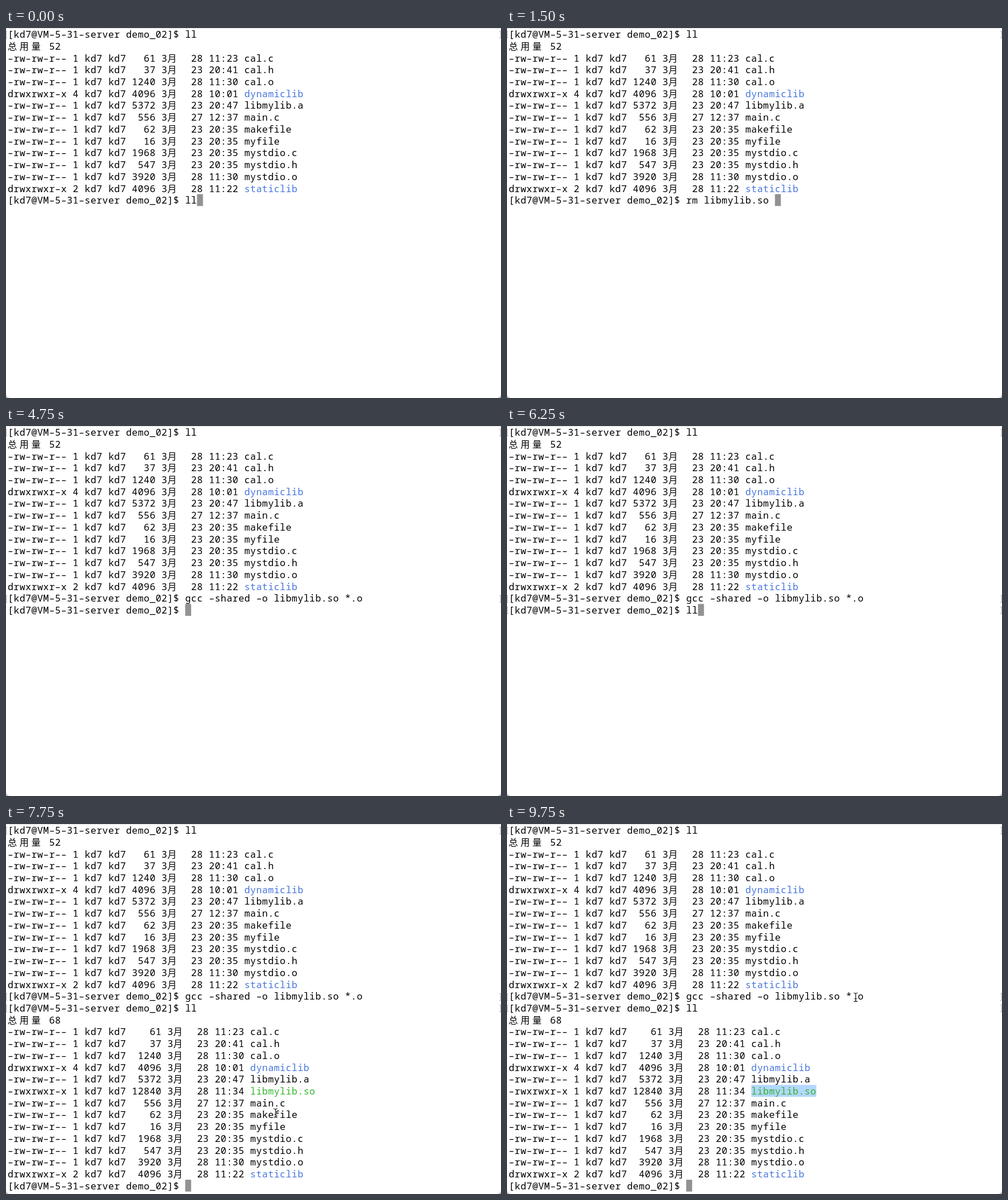
These frames come from a looping animation (866 by 647 pixels, 10000 ms). An HTML page:

```html
<!DOCTYPE html>
<html lang="zh">
<head>
<meta charset="utf-8">
<title>Terminal</title>
<style>
  html, body { margin: 0; width: 100%; height: 100%; overflow: hidden; background: #b9b9b9; }
  svg { display: block; width: 866px; height: 647px; }
  text { font: 16.5px "Noto Sans Mono", monospace; letter-spacing: .45px; white-space: pre; }
  text.han { font: 16px "Noto Sans CJK SC", "Noto Sans CJK", sans-serif; letter-spacing: 0; }
  .mark { fill: none; stroke: #b4b4b4; }
  .halo { stroke: #fff; stroke-width: 3; }
  .beam { stroke: #111; stroke-width: 1.2; }
  #mouse { fill: none; stroke-linecap: round; }
</style>
</head>
<body>
<svg id="stage" viewBox="0 0 866 647">
  <path d="M0 0H866V639Q866 647 858 647H8Q0 647 0 639Z" fill="#fff"/>
  <path d="M0 .5H866" stroke="#dcdcdc"/>
  <rect id="select" height="20.7" fill="#b3d7ff"/>
  <rect id="caret" width="10.4" height="20.7" fill="#929292"/>
  <g id="screen"></g>
  <g id="mouse">
    <path class="halo" d="M-3-7.5Q0-7.5 0-5.5Q0-7.5 3-7.5M0-5.5V5.5M-3 7.5Q0 7.5 0 5.5Q0 7.5 3 7.5M-1.5 2.5H1.5"/>
    <path class="beam" d="M-3-7.5Q0-7.5 0-5.5Q0-7.5 3-7.5M0-5.5V5.5M-3 7.5Q0 7.5 0 5.5Q0 7.5 3 7.5M-1.5 2.5H1.5"/>
  </g>
</svg>
<script>
const CELL = 10.35, LINE = 20.72, LOOP = 10000;
const BLUE = '#4876dc', GREEN = '#34b42c';
const PROMPT = '[kd7@VM-5-31-server demo_02]$ ';
const BUILD = 'gcc -shared -o libmylib.so *.o';
const FILES = `-rw-rw-r-- 1 61 28 11:23 cal.c
-rw-rw-r-- 1 37 23 20:41 cal.h
-rw-rw-r-- 1 1240 28 11:30 cal.o
drwxrwxr-x 4 4096 28 10:01 dynamiclib
-rw-rw-r-- 1 5372 23 20:47 libmylib.a
-rw-rw-r-- 1 556 27 12:37 main.c
-rw-rw-r-- 1 62 23 20:35 makefile
-rw-rw-r-- 1 16 23 20:35 myfile
-rw-rw-r-- 1 1968 23 20:35 mystdio.c
-rw-rw-r-- 1 547 23 20:35 mystdio.h
-rw-rw-r-- 1 3920 28 11:30 mystdio.o
drwxrwxr-x 2 4096 28 11:22 staticlib`.split('\n');
const LIBRARY = '-rwxrwxr-x 1 12840 28 11:34 libmylib.so';

// [start ms, value]
const COMMANDS = [[0, 'll'], [250, 'clear'], [750, 'll'], [1250, 'rm libmylib.so '], [2500, 'll'], [3000, BUILD]];
const CARETS = [[4750, [15, 30]], [6000, [15, 32]], [6500, [30, 30]]];
const SELECTION = [[0, 0], [8500, 8], [8750, 10], [9000, 11]];
const MOUSE = [
  [0, null], [7250, [429.5, 538]], [7500, null], [7750, [471.5, 505.5]],
  [8000, [439, 482.5]], [8250, [432, 468.5]], [8500, [516, 464.5]],
  [8750, [537, 465]], [9000, [551.5, 463.5]], [9250, [564.5, 457]], [9500, [610, 303]]
];

const $ = id => document.getElementById(id);
const colX = col => 3 + col * CELL;
const rowY = row => .45 + row * LINE;
const pick = (steps, t) => (steps.filter(s => s[0] <= t).pop() || [])[1];

function add(parent, tag, attrs) {
  const el = document.createElementNS('http://www.w3.org/2000/svg', tag);
  for (const key in attrs) el.setAttribute(key, attrs[key]);
  return parent.appendChild(el);
}

const group = () => add($('screen'), 'g', {});
const wide = s => s.replace(/-/g, '–');

// Chinese characters take two cells, all others one.
function write(parent, row, col, str, fill = '#000') {
  let el;
  for (const run of str.match(/[\u4e00-\u9fff]|[^\u4e00-\u9fff]+/g) || ['']) {
    const han = run >= '\u4e00';
    el = add(parent, 'text', { x: colX(col), y: rowY(row) + 16.7, fill, class: han ? 'han' : '' });
    el.textContent = wide(run);
    col += han ? 2 : run.length;
  }
  return el;
}

function list(parent, row, total, files, width) {
  write(parent, row, 0, '总用量 ' + total);
  files.forEach((file, i) => {
    const [mode, links, size, day, time, name] = file.split(' ');
    const info = `${mode} ${links} kd7 kd7 ${size.padStart(width)} 3月  ${day} ${time}`;
    const fill = mode[0] === 'd' ? BLUE : mode.includes('x') ? GREEN : '#000';
    write(parent, row + 1 + i, 0, info);
    write(parent, row + 1 + i, 36 + width, name, fill);
  });
}

function mark(row) {
  const y = Math.round(rowY(row) + 5) + .5;
  return add($('screen'), 'path', { class: 'mark', d: `M2 ${y}H.5v12H2M863 ${y}h2.5v12H863` });
}

const first = group();
write(first, 0, 0, PROMPT + 'll');
list(first, 1, 52, FILES, 4);
write(first, 14, 0, PROMPT);
mark(0);
const command = write(first, 14, 30, '');

const prompt = group();
write(prompt, 15, 0, PROMPT);
const typed = group();
write(typed, 15, 30, 'll');
const second = group();
list(second, 16, 68, [...FILES.slice(0, 5), LIBRARY, ...FILES.slice(5)], 5);
write(second, 30, 0, PROMPT);

const REVEALS = [[mark(14), 4500], [prompt, 4750], [typed, 6000], [mark(15), 6250], [second, 6500]];
const show = (el, on) => el.setAttribute('visibility', on ? 'visible' : 'hidden');

function place(el, x, y) {
  el.setAttribute('x', x);
  el.setAttribute('y', y);
}

function draw(t) {
  const line = pick(COMMANDS, t);
  const [row, col] = pick(CARETS, t) || [14, 30 + line.length];
  const mouse = pick(MOUSE, t);
  if (command.textContent !== wide(line)) command.textContent = wide(line);
  place($('caret'), colX(col), rowY(row));
  place($('select'), colX(41), rowY(22));
  $('select').setAttribute('width', pick(SELECTION, t) * CELL);
  REVEALS.forEach(([el, start]) => show(el, t >= start));
  show($('mouse'), mouse);
  if (mouse) $('mouse').setAttribute('transform', `translate(${mouse})`);
}

const begin = performance.now();
function tick() {
  draw((performance.now() - begin) % LOOP);
  requestAnimationFrame(tick);
}
tick();
</script>
</body>
</html>
```
